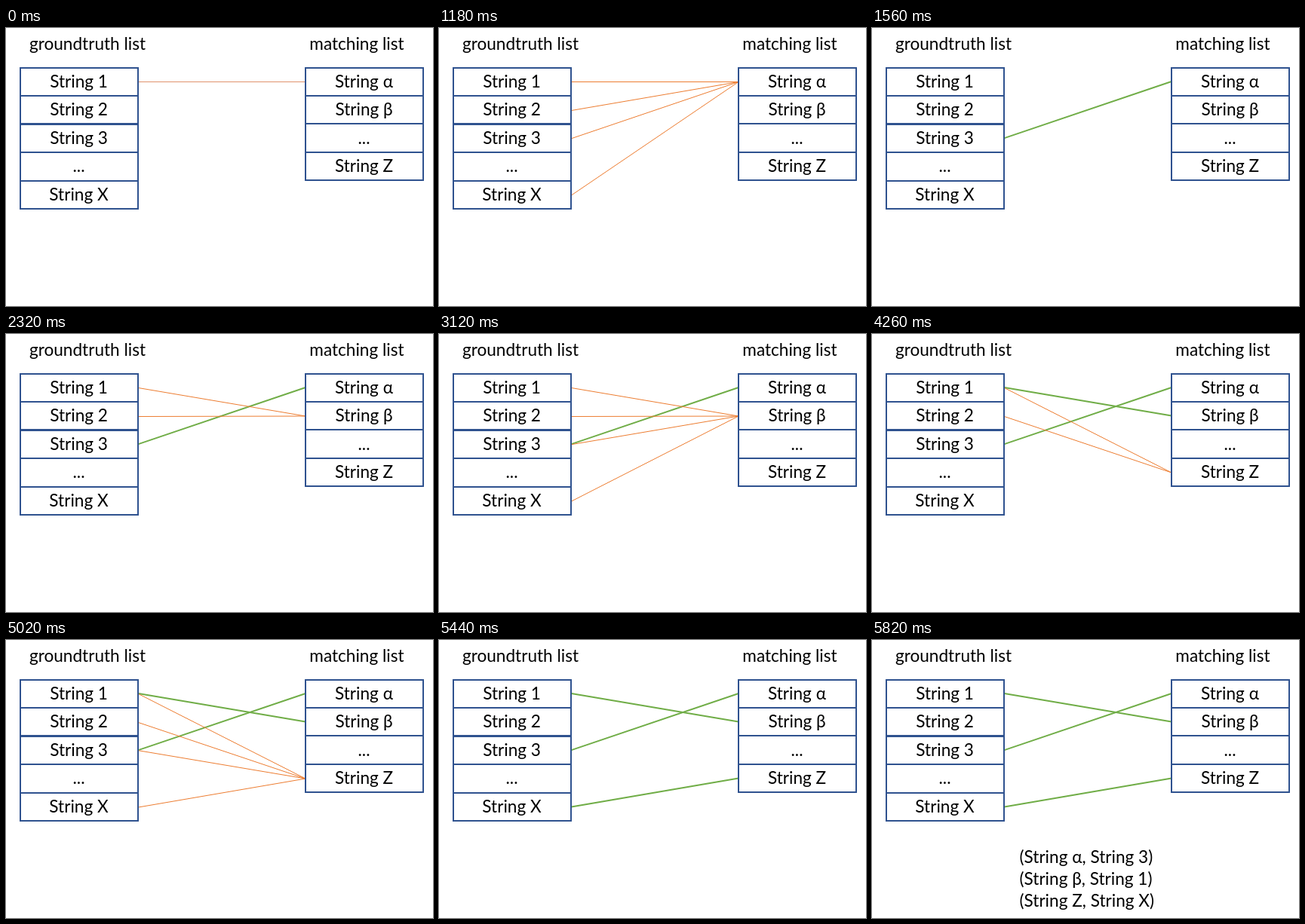
Recreate the animation shown at these times as an HTML page with a canvas. Size 566x369 px, loop 6200 ms.

```html
<!DOCTYPE html>
<html lang="en">
<head>
<meta charset="utf-8">
<title>List matching</title>
<style>
  html, body { margin: 0; width: 100%; height: 100%; overflow: hidden; background: #fff; }
  canvas { display: block; }
</style>
</head>
<body>
<canvas id="stage" width="566" height="369"></canvas>
<script>
const ctx = document.getElementById('stage').getContext('2d');
const LOOP = 6200;
const BLUE = '#2f528f', ORANGE = '#ed7d31', PALE = '#e0936e', GREEN = '#70ad47';

// Start time of each step: per round four comparisons, then the match; finally the result.
const starts = [0, 420, 800, 1180, 1560, 1940, 2320, 2740, 3120, 3500,
                3880, 4260, 4640, 5020, 5440, 5820];
const leftY = [71.5, 109.5, 146.7, 222];
const rightY = [71.5, 109, 184];
const matches = [2, 0, 3];

function line(x1, y1, x2, y2, color, width) {
  ctx.strokeStyle = color;
  ctx.lineWidth = width;
  ctx.beginPath();
  ctx.moveTo(x1, y1);
  ctx.lineTo(x2, y2);
  ctx.stroke();
}

function text(str, x, y, align = 'center') {
  ctx.textAlign = align;
  ctx.fillText(str, x, y);
}

function list(title, titleX, x, rules, rows) {
  const top = rules[0], bottom = rules[rules.length - 1];
  text(title, titleX, 29);
  rows.forEach((row, i) => text(row, x + 77.5, 79 + Math.round(i * 37.5 - 0.1)));
  for (const y of rules) line(x, y, x + 156, y, BLUE, y % 1 ? 3 : 2);
  ctx.strokeStyle = BLUE;
  ctx.lineWidth = 2;
  ctx.strokeRect(x, top, 156, bottom - top);
}

function link(from, to, color, width) {
  const lift = width > 1 ? 0.5 : 0;
  line(175.5, leftY[from] - lift, 397, rightY[to] - lift, color, width);
}

function draw(time) {
  const step = starts.findLastIndex(start => start <= time);
  const round = Math.floor(step / 5), phase = step % 5;
  const matched = phase === 4 ? round + 1 : round;

  ctx.fillStyle = '#fff';
  ctx.fillRect(0, 0, 566, 369);
  ctx.fillStyle = '#000';
  ctx.font = '22.6px Lato, "Open Sans", "Noto Sans", sans-serif';

  for (let i = 0; i < matched; i++) link(matches[i], i, GREEN, 1.9);
  if (round < 3 && phase < 4) {
    for (let i = 0; i <= phase; i++) link(i, round, step ? ORANGE : PALE, 1);
  }

  list('groundtruth list', 108, 19, [53, 90, 127.5, 165, 203, 240],
       ['String 1', 'String 2', 'String 3', '...', 'String X']);
  list('matching list', 465, 397, [53, 90, 127, 165, 202],
       ['String α', 'String β', '...', 'String Z']);

  if (round === 3) {
    ['(String α, String 3)', '(String β, String 1)', '(String Z, String X)']
      .forEach((pair, i) => text(pair, 195.5, 296 + i * 29, 'left'));
  }
}

const begin = performance.now();
function tick() {
  draw((performance.now() - begin) % LOOP);
  requestAnimationFrame(tick);
}
tick();
</script>
</body>
</html>
```
